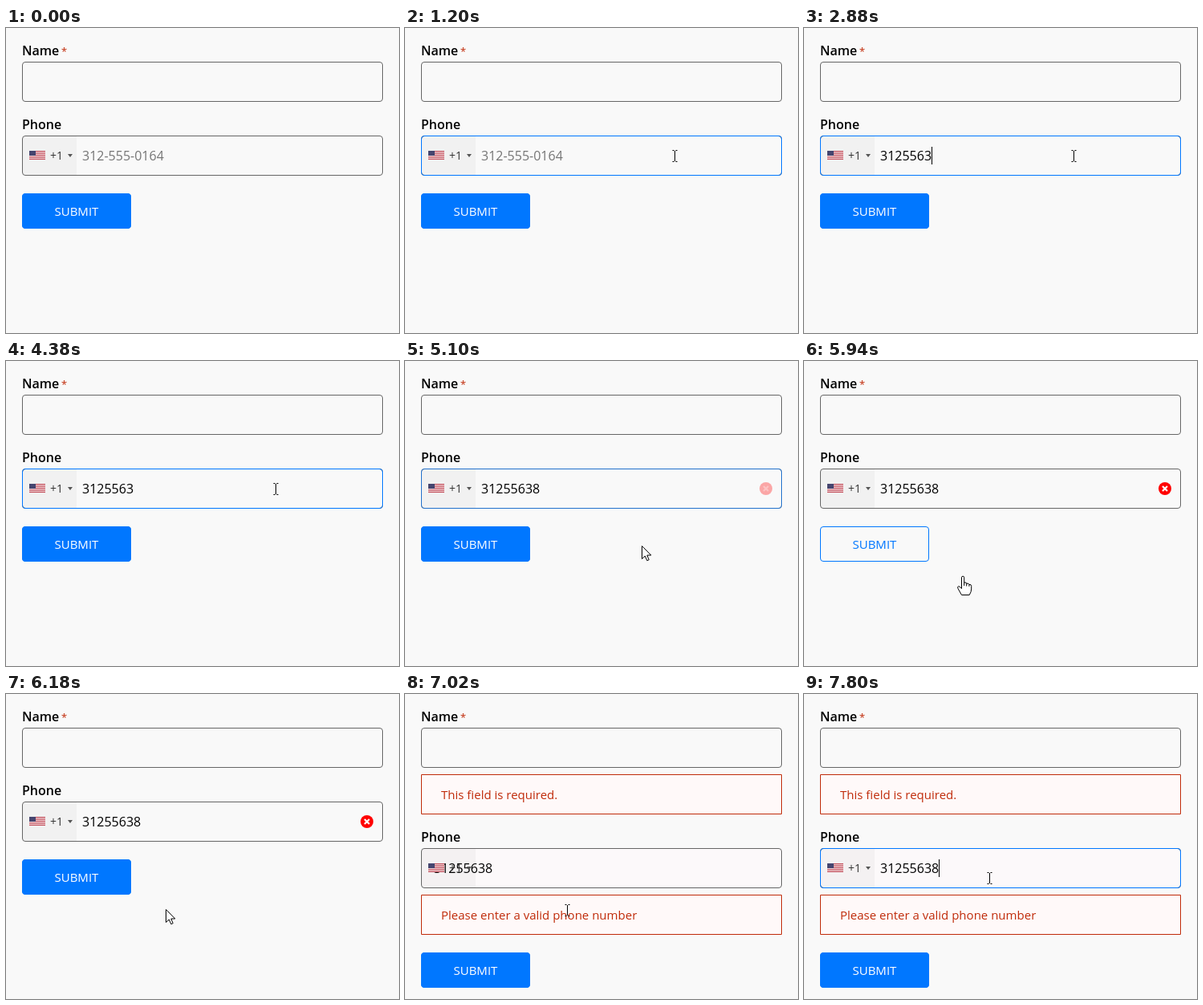
These frames come from a looping animation (490x380 px, 8 s). An HTML page with a canvas:

```html
<!DOCTYPE html>
<html lang="en">
<head>
<meta charset="utf-8">
<title>Form validation</title>
<style>
  html, body { margin: 0; width: 100%; height: 100%; overflow: hidden; background: #f9f9f9; }
  canvas { display: block; }
</style>
</head>
<body>
<canvas id="stage" width="490" height="380"></canvas>
<script>
const ctx = document.getElementById('stage').getContext('2d');
const LOOP = 8000, STEP = 60, RELOAD = 6420;
const PAGE = '#f9f9f9', BLUE = '#0077ff', GREY = '#666', RED = '#c02b0a', BLACK = '#000';

const PLACEHOLDER = '312-555-0164', TYPED = '31255638', DIGIT = 9.15;
const KEY_TIMES = [1440, 1620, 1800, 2040, 2220, 2640, 2880, 4620];
const CARET_ON = [[720, 1200], [1440, 3360], [3840, 4380], [4620, 5100], [7680, LOOP]];

// Pointer path: time, x, y, shape from that time on
const PATH = [
  [240, 488, 48, 'arrow'], [300, 466, 60, 'beam'], [420, 416, 90, 'arrow'],
  [540, 362, 122, 'arrow'], [600, 350, 138, 'beam'], [720, 336, 159, 'beam'],
  [4680, 336, 159, 'beam'], [4860, 328, 184, 'arrow'], [5100, 295, 230, 'arrow'],
  [5400, 192, 247, 'arrow'], [5520, 154, 244, 'hand'], [5640, 128, 240, 'hand'],
  [5700, 128, 240, 'hand'], [5940, 198, 268, 'hand'], [6000, 199, 268, 'arrow'],
  [6420, 199, 268, 'beam'], [7020, 202, 269, 'beam'], [7200, 203, 268, 'beam'],
  [7560, 231, 229, 'beam'], [LOOP, 231, 229, 'beam']
];

const SHAPES = {
  arrow: ['M.5 .5V16.5L4.3 13 6.8 18.7 9.2 17.7 6.8 12H11.8Z'],
  hand: [
    'M-1.5 14V1.8a1.6 1.6 0 0 1 3.2 0V8q2.8-.6 3 1.2 2.8-.5 3.2 1.2 2.8-.3 2.8 2V16' +
    'q0 3.5-2.5 7.5H-1.5L-6 15.5q-1.2-2.5 .8-2.8 1.5 0 3.7 2.8Z',
    'M1.7 8v4M4.7 9.2v3.3M7.9 10.4v2.5'
  ],
  beam: ['M.5-6V7M-2.5-6.5h2M1.5-6.5h2M-2.5 7.5h2M1.5 7.5h2']
};
for (const name in SHAPES) SHAPES[name] = SHAPES[name].map(d => new Path2D(d));

const ramp = (t, from, to) => Math.min(1, Math.max(0, (t - from) / (to - from)));

function fade(alpha, draw) {
  if (alpha <= 0) return;
  ctx.save();
  ctx.globalAlpha = alpha;
  draw();
  ctx.restore();
}

function text(string, x, y, size, color, weight = 400) {
  ctx.font = `${weight} ${size}px "Open Sans", sans-serif`;
  ctx.fillStyle = color;
  ctx.fillText(string, x, y);
}

function box(x, y, w, h, radius, stroke, fill) {
  ctx.beginPath();
  ctx.roundRect(x + .5, y + .5, w - 1, h - 1, radius);
  if (fill) { ctx.fillStyle = fill; ctx.fill(); }
  ctx.strokeStyle = stroke;
  ctx.lineWidth = 1;
  ctx.stroke();
}

function message(string, y) {
  box(20, y, 450, 50, 0, RED, '#fff9f9');
  text(string, 45, y + 31, 15, RED);
}

function country(y) {
  ctx.fillStyle = 'rgba(0,0,0,.03)';
  ctx.fillRect(21, y + 1, 67, 48);
  const top = y + 19, stripe = 11 / 13;
  ctx.fillStyle = '#fff';
  ctx.fillRect(29, top, 20, 11);
  ctx.fillStyle = '#b8303f';
  for (let i = 0; i < 13; i += 2) ctx.fillRect(29, top + i * stripe, 20, stripe);
  ctx.fillStyle = '#45456f';
  ctx.fillRect(29, top, 8, 6);
  text('+1', 55, y + 30, 14, '#333');
  ctx.fillStyle = '#555';
  ctx.beginPath();
  ctx.moveTo(77, y + 23);
  ctx.lineTo(83, y + 23);
  ctx.lineTo(80, y + 27);
  ctx.fill();
}

function invalidIcon(x, y) {
  ctx.fillStyle = '#f00';
  ctx.beginPath();
  ctx.arc(x, y, 8, 0, Math.PI * 2);
  ctx.fill();
  ctx.strokeStyle = '#fff';
  ctx.lineWidth = 2.2;
  ctx.beginPath();
  for (const s of [-1, 1]) {
    ctx.moveTo(x - 3, y - 3 * s);
    ctx.lineTo(x + 3, y + 3 * s);
  }
  ctx.stroke();
}

function phoneField(t, y, failed) {
  const blur = ramp(t, 5040, 5220);
  const focus = failed ? ramp(t, 7500, 7680) : ramp(t, 600, 720) - blur;
  box(20, y, 450, 50, 3.5, GREY, failed ? '#fcf9fa' : PAGE);
  fade(focus, () => box(20, y, 450, 50, 3.5, BLUE));

  const count = KEY_TIMES.filter(time => time <= t).length;
  const left = failed && t < 7140 ? 36 : 95;
  if (count) text(TYPED.slice(0, count), left, y + 31, 16, BLACK);
  else text(PLACEHOLDER, left, y + 31, 16, '#757575');
  country(y);

  if (CARET_ON.some(([on, off]) => t >= on && t < off)) {
    ctx.fillStyle = BLACK;
    ctx.fillRect(Math.floor(left + count * DIGIT), y + 14, 1, 22);
  }
  if (!failed) fade(blur, () => invalidIcon(450, y + 25));
}

function submitButton(t, y) {
  const hover = ramp(t, 5460, 5640) - ramp(t, 6000, 6180);
  const label = color => text('SUBMIT', 60.5, y + 28, 15, color);
  box(20, y, 136, 44, 3.5, BLUE, PAGE);
  label(BLUE);
  fade(1 - hover, () => {
    box(20, y, 136, 44, 3.5, BLUE, BLUE);
    label('#fff');
  });
}

function pointer(t) {
  const next = PATH.findIndex(point => point[0] > t);
  if (next < 1) return;
  const [t0, x0, y0, shape] = PATH[next - 1], [t1, x1, y1] = PATH[next];
  const k = ramp(t, t0, t1);
  ctx.save();
  ctx.translate(Math.round(x0 + (x1 - x0) * k), Math.round(y0 + (y1 - y0) * k));
  ctx.lineWidth = 1;
  ctx.strokeStyle = BLACK;
  ctx.fillStyle = '#fff';
  if (shape !== 'beam') ctx.fill(SHAPES[shape][0]);
  SHAPES[shape].forEach(path => ctx.stroke(path));
  ctx.restore();
}

function render(t) {
  const failed = t >= RELOAD;
  const shift = failed ? 58 : 0;
  ctx.fillStyle = PAGE;
  ctx.fillRect(0, 0, 490, 380);

  text('Name', 20, 34, 16, BLACK, 600);
  text('*', 69, 34, 12.8, RED);
  box(20, 42, 450, 50, 3.5, GREY);
  text('Phone', 20, 126 + shift, 16, BLACK, 600);
  phoneField(t, 134 + shift, failed);
  submitButton(t, 206 + 2 * shift);
  if (failed) {
    message('This field is required.', 100);
    message('Please enter a valid phone number', 250);
  }
  pointer(t);
}

function frame() {
  const t = performance.now() % LOOP;
  render(Math.floor(t / STEP) * STEP);
  requestAnimationFrame(frame);
}
frame();
</script>
</body>
</html>
```
